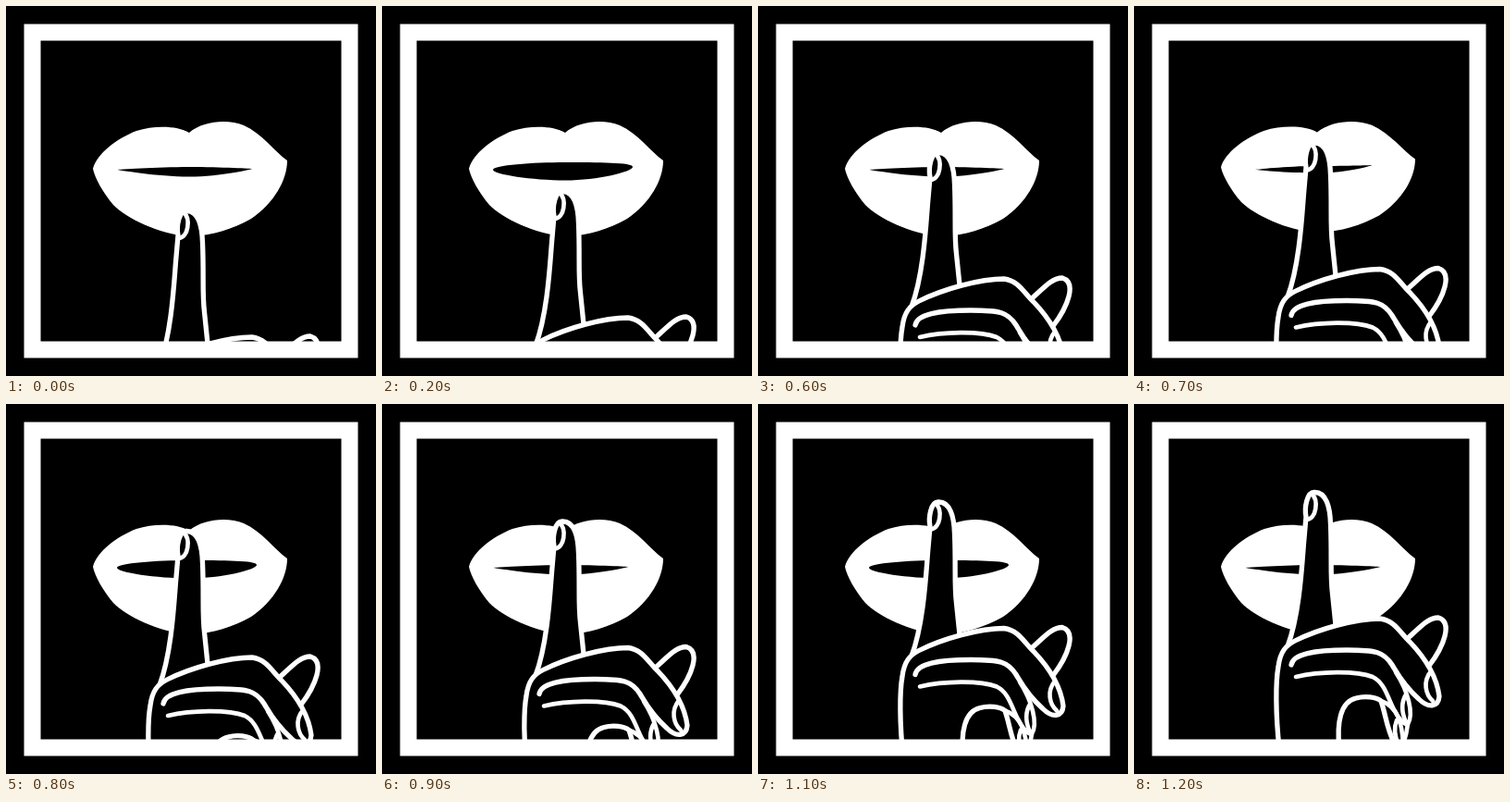
Write an HTML page that moves like this. It is 400 by 400 pixels and loops after 2.7 s.

```html
<!DOCTYPE html>
<html lang="en">
<head>
<meta charset="utf-8">
<title>Hush</title>
<style>
  html, body { margin: 0; width: 100%; height: 100%; overflow: hidden; background: #000; }
  svg { display: block; width: 100%; height: 100%; }
  #hand { fill: none; stroke: #fff; stroke-width: 5.3; stroke-linecap: round; stroke-linejoin: round; }
  #hand .solid { fill: #000; }
  #hand .thin { stroke-width: 4.6; }
</style>
</head>
<body>
<svg viewBox="0 0 400 400">
  <rect width="400" height="400"/>
  <path id="lips" fill="#fff" d="M94 176C98 160 120 143 141 135C160 129 185 129 198 137C213 124 240 122 257 129
    C277 138 291 158 304 167C304 188 290 213 265 230C245 241 225 248 198 249C165 247 130 229 116 215C105 202 96 186 94 176Z"/>
  <path id="mouth"/>
  <g id="hand">
    <!-- little finger -->
    <path d="M295 254C308 243 317 231 329 231C345 236 335 262 319 283"/>
    <!-- raised finger and nail -->
    <path class="solid" d="M166 262C180 225 182 165 184 145L186 122C184 112 187 95 195 95.5C208 95 212 112 212.5 130C214 165 212 185 214.5 205L218 239"/>
    <path class="thin" d="M192 97C200 104 197 124 187 125"/>
    <!-- back of the hand and first curled finger -->
    <path class="solid" d="M157 372C153 335 153 300 156 284C158 268 164 261 174 256C200 243 240 232 266 232C282 234 288 248 298 257
      C320 280 328 300 330 316C329 328 318 329 308 319C290 303 284 290 279 282C270 268 262 266 230 266C195 266 172 270 170 282"/>
    <path class="thin" d="M321 289C312 300 315 314 323 321"/>
    <!-- second curled finger -->
    <path class="thin" d="M175 295C200 289 240 288 258 295C272 302 274 318 282 332C286 340 292 347 296 346C303 335 296 310 283 290"/>
    <path class="thin" d="M294 314C288 324 290 335 294 344"/>
    <!-- third finger and thumb -->
    <path d="M222 372C219 345 223 322 240 318C250 315 262 317 267 321C272 335 273 350 281 366"/>
    <path class="thin" d="M267 321C285 327 290 345 291 368C293 362 295 355 296 346M284 342C280 352 283 362 286 368"/>
  </g>
  <path fill-rule="evenodd" d="M0 0H400V400H0ZM28 28V372H372V28Z"/>
  <rect x="28.5" y="28.5" width="343" height="343" fill="none" stroke="#fff" stroke-width="18"/>
</svg>
<script>
const STEP = 100, STEPS = 12, LOOP = 2700, RISE = 10.5;
const LIP_TOP = 125;
const [lips, mouth, hand] = ['lips', 'mouth', 'hand'].map(id => document.getElementById(id));

// The lips cycle through half shut, nearly shut and open; round blunts the corners.
const poses = [
  { left: 120, right: 267, rightY: 176, top: 174, bottom: 184.5, round: 0, squash: 1 },
  { left: 131, right: 258, rightY: 172, top: 173, bottom: 180.5, round: 0, squash: 0.967 },
  { left: 120, right: 271, rightY: 174, top: 169, bottom: 188.5, round: 5, squash: 1 }
];

function mouthPath({ left, right, rightY, top, bottom, round }) {
  const y = 177, mid = 198;
  return `M${left} ${y}C${left} ${y - round} ${mid - 35} ${top} ${mid} ${top}
    S${right} ${rightY - round} ${right} ${rightY}
    C${right} ${rightY + round} ${mid + 35} ${bottom} ${mid} ${bottom}
    S${left} ${y + round} ${left} ${y}Z`;
}

function draw(ms) {
  const step = Math.min(STEPS, Math.floor(ms % LOOP / STEP));
  const pose = poses[step % poses.length];
  mouth.setAttribute('d', mouthPath(pose));
  lips.setAttribute('transform', `translate(0 ${LIP_TOP * (1 - pose.squash)}) scale(1 ${pose.squash})`);
  hand.setAttribute('transform', `translate(0 ${(STEPS - step) * RISE})`);
}

const start = performance.now();
function tick() {
  draw(performance.now() - start);
  requestAnimationFrame(tick);
}
tick();
</script>
</body>
</html>
```
